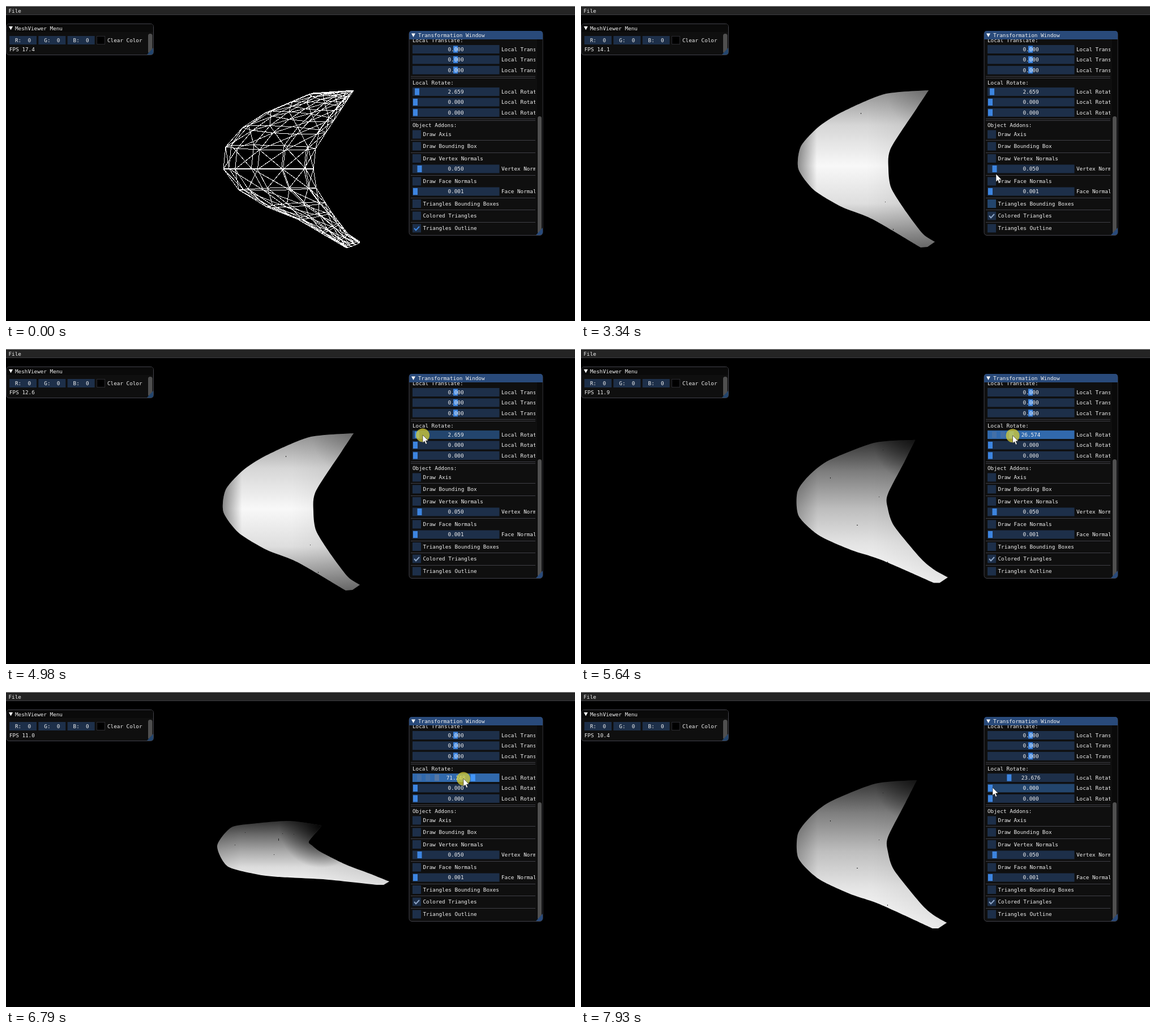
An HTML page for the animation above (8000 ms loop, 1005 px wide and 557 px high).

```html
<!DOCTYPE html>
<html lang="en">
<head>
<meta charset="utf-8">
<title>Mesh viewer</title>
<style>
html, body { margin: 0; width: 100%; height: 100%; overflow: hidden; background: #000; }
svg { display: block; }
text { font: 9.3px "DejaVu Sans Mono", monospace; fill: #f2f2f2; white-space: pre; }
</style>
</head>
<body>
<svg id="stage" width="1005" height="557" viewBox="0 0 1005 557">
  <defs>
    <clipPath id="panelClip"><rect x="713" y="59" width="222" height="345"/></clipPath>
    <linearGradient id="light" x1="0" y1="0" x2="0" y2="1"></linearGradient>
    <linearGradient id="rim"></linearGradient>
    <radialGradient id="tipShade" gradientUnits="userSpaceOnUse" r="75"></radialGradient>
  </defs>
</svg>
<script>
const LOOP = 8000, LAG = 150;
const stage = document.getElementById('stage');
const byId = id => document.getElementById(id);

function add(parent, tag, attrs, content) {
  const el = document.createElementNS('http://www.w3.org/2000/svg', tag);
  for (const k in attrs) el.setAttribute(k, attrs[k]);
  if (content !== undefined) el.textContent = content;
  return parent.appendChild(el);
}
const box = (p, x, y, width, height, fill, extra) =>
  add(p, 'rect', { x, y, width, height, fill, ...extra });
const label = (p, x, mid, s, extra) => add(p, 'text', { x, y: mid + 3.3, ...extra }, s);
const shape = (p, d, fill, extra) => add(p, 'path', { d, fill, ...extra });
const show = (el, on) => el.setAttribute('visibility', on ? 'visible' : 'hidden');
const lerp = (a, b, u) => a + (b - a) * u;

// Piecewise linear track: rows of [time, ...values].
function track(keys, t) {
  if (t <= keys[0][0]) return keys[0].slice(1);
  const i = keys.findIndex(k => k[0] > t);
  if (i < 0) return keys[keys.length - 1].slice(1);
  const a = keys[i - 1], b = keys[i], u = (t - a[0]) / (b[0] - a[0]);
  return a.slice(1).map((v, j) => lerp(v, b[j + 1], u));
}
const held = (keys, t) => keys.filter(k => k[0] <= t).pop()[1];

// ---- mesh ----
// Silhouette per angle: 10 outer points from the upper tip, the end cap, then 7 inner points.
const pose = (angle, pts, tones, rim, tip, specks) => ({
  angle, tones, rim, tip, specks, pts: pts.split(' ').map(p => p.split(',').map(Number))
});
const poses = [
  pose(2.659, '614,149 535,156 458,189 418,215 388,249 384,288 411,325 460,355 515,377 600,427 612,426 625,417 604,403 575,365 548,322 543,288 547,252 593,181',
    [145, 214, 248, 222, 112], .44, .2, 'M494 189h1v2h-1zM537 346h1v1h-1zM551 394h1v2h-1z'),
  pose(23.676, '593,156 520,162 440,194 405,221 383,251 384,294 419,330 475,357 527,375 621,418 631,418 646,408 622,394 600,374 553,315 542,282 542,257 573,196',
    [50, 126, 190, 228, 255], .25, .6, 'M533 178h1v1h-1zM440 227h1v2h-1zM526 261h1v1h-1zM487 311h2v1h-2zM541 376h1v2h-1z'),
  pose(62.944, '556,222 500,213 433,222 397,236 374,266 390,307 435,324 497,334 560,341 652,359 664,358 673,350 640,339 600,321 556,290 539,273 536,264 552,237',
    [35, 110, 172, 214, 255], .1, .95, 'M486 236h1v1h-1zM503 245h1v1h-1zM516 234h1v1h-1zM421 254h1v2h-1zM483 321h1v1h-1zM521 319h1v1h-1z'),
  pose(71.248, '557,236 500,228 434,233 397,240 373,272 391,308 441,322 480,327 560,331 655,341 667,341 677,335 642,321 600,305 556,283 540,271 535,264 554,241',
    [48, 108, 170, 220, 244], .1, .95, 'M422 248h1v1h-1zM404 270h1v1h-1zM488 250h1v1h-1zM508 251h1v1h-1zM481 259h1v4h-1zM473 287h1v1h-1z')
];

// Smooth open curve through the points, as Bezier commands after the first point.
function curve(pts) {
  let d = '';
  for (let i = 0; i < pts.length - 1; i++) {
    const a = pts[i], b = pts[i + 1], before = pts[i - 1] || a, after = pts[i + 2] || b;
    const c1 = a.map((v, k) => v + (b[k] - before[k]) / 8);
    const c2 = b.map((v, k) => v - (after[k] - a[k]) / 8);
    d += 'C' + [...c1, ...c2, ...b].map(v => v.toFixed(1)).join(' ');
  }
  return d;
}
const outline = pts => `M${pts[0]}${curve(pts.slice(0, 10))}L${pts[10]}L${pts[11]}` +
  curve([...pts.slice(11), pts[0]]) + 'Z';

// Rings of ten vertices span the silhouette; quads between them are split by a diagonal.
function wires(pts) {
  const outer = pts.slice(0, 10), inner = [pts[0], ...pts.slice(11).reverse()];
  const at = (chain, i) => {
    const a = chain[Math.floor(i)], b = chain[Math.ceil(i)];
    return a.map((v, k) => lerp(v, b[k], i % 1));
  };
  const spans = [[0, 0], [.5, .3], [1, .6], [1.5, 1], [2, 1.3], [3, 1.6], [4, 2], [5, 3],
    [6, 4], [7, 4.6], [8, 5], [8.5, 5.5], [8.8, 6], [9, 7]];
  const N = 10;
  const rings = spans.map(([o, n]) => {
    const l = at(outer, o), r = at(inner, n);
    const depth = (r[0] - l[0]) / 4;
    return Array.from({ length: N }, (_, j) => {
      const phi = j / N * 2 * Math.PI, u = .5 - Math.cos(phi) / 2;
      const z = depth * Math.sin(phi), k = 1 + z / 438;
      return { z, x: 502.5 + (lerp(l[0], r[0], u) - 502.5) * k,
        y: 278.5 + (lerp(l[1], r[1], u) - 278.5) * k - z * .046 };
    });
  });
  const d = { front: '', back: '' };
  const edge = (a, b) => {
    d[a.z > -.01 && b.z > -.01 ? 'front' : 'back'] +=
      `M${a.x.toFixed(1)} ${a.y.toFixed(1)}L${b.x.toFixed(1)} ${b.y.toFixed(1)}`;
  };
  rings.forEach((ring, i) => ring.forEach((v, j) => {
    edge(v, ring[(j + 1) % N]);
    const next = rings[i + 1];
    if (!next) return;
    edge(v, next[j]);
    edge(v, next[(j + 1) % N]);
  }));
  return d;
}

const stops = (id, list) => list.map(([offset, opacity]) =>
  add(byId(id), 'stop', { offset, 'stop-color': '#000', 'stop-opacity': opacity }));
const lightStops = stops('light', [[0, 1], [.22, 1], [.48, 1], [.72, 1], [1, 1]]);
const rimStops = stops('rim', [[0, .4], [.14, 0], [.5, 0], [1, .1]]);
const tipStops = stops('tipShade', [[0, 1], [1, 0]]);

const solid = add(stage, 'g', {});
const layers = ['light', 'rim', 'tipShade'].map(id => shape(solid, '', `url(#${id})`));
const specks = shape(solid, '', '#222');
const net = wires(poses[0].pts);
const wire = { stroke: '#fff', 'stroke-width': 1, 'shape-rendering': 'crispEdges' };
const backWire = shape(stage, net.back, 'none', wire);
const frontWire = shape(stage, net.front, 'none', wire);

function drawMesh(angle) {
  let i = 0;
  while (i < poses.length - 2 && angle > poses[i + 1].angle) i++;
  const a = poses[i], b = poses[i + 1];
  const u = (angle - a.angle) / (b.angle - a.angle), v = Math.min(1, u);
  const pts = a.pts.map((p, j) => p.map((c, k) => lerp(c, b.pts[j][k], u)));
  const d = outline(pts);
  layers.forEach(el => el.setAttribute('d', d));
  lightStops.forEach((s, j) => {
    const g = Math.round(lerp(a.tones[j], b.tones[j], v));
    s.setAttribute('stop-color', `rgb(${g},${g},${g})`);
  });
  rimStops[0].setAttribute('stop-opacity', lerp(a.rim, b.rim, v));
  tipStops[0].setAttribute('stop-opacity', lerp(a.tip, b.tip, v));
  byId('tipShade').setAttribute('cx', pts[0][0]);
  byId('tipShade').setAttribute('cy', pts[0][1]);
  specks.setAttribute('d', (v > .5 ? b : a).specks);
}

// ---- interface ----
const FRAME = '#1d2f49', HOVER = '#23456d', ACTIVE = '#3169ac', GRAB = '#3d85e0';
const border = { rx: 5, stroke: '#42424a' };

box(stage, 0, 0, 1005, 15, '#242424');
box(stage, 0, 0, 1005, 1, '#9a9a9a');
box(stage, 0, 15, 1005, 1, '#3c3c40');
label(stage, 4.5, 9, 'File');

box(stage, .5, 31.5, 260, 55, '#0f0f0f', border);
shape(stage, 'M1 46V36q0-4 4-4H256q4 0 4 4V46Z', '#0a0a0a');
shape(stage, 'M5 36h7l-3.500 6.500z', '#fff');
label(stage, 16, 39.500, 'MeshViewer Menu');
['R', 'G', 'B'].forEach((c, i) => {
  box(stage, 6 + i * 51.3, 53, 48, 15, FRAME);
  label(stage, 30 + i * 51.3, 61, c + ':  0', { 'text-anchor': 'middle' });
});
box(stage, 160.5, 53.5, 14, 14, '#000', { stroke: '#2b2b30' });
label(stage, 179, 61, 'Clear Color');
const fps = label(stage, 6, 77, '');
box(stage, 251, 49, 7.5, 35, '#4f4f4f', { rx: 3.500 });
shape(stage, 'M260 74V82q0 4-4 4H249Z', HOVER);

box(stage, 712, 44.5, 236, 361, '#0f0f0f', border);
shape(stage, 'M712 59V49q0-5 5-5H943q5 0 5 5V59Z', '#294a7a');
shape(stage, 'M716 48.500h7l-3.500 6.500z', '#fff');
label(stage, 728, 52, 'Transformation Window');
box(stage, 938, 59, 9.5, 345, '#0a0a0a');
box(stage, 939, 195, 7, 208, '#4f4f4f', { rx: 3.500 });
shape(stage, 'M948 392V400q0 5-5 5H936Z', '#294a7a');

const panel = add(stage, 'g', { 'clip-path': 'url(#panelClip)' });
[[61, 'Local Translate:'], [135.5, 'Local Rotate:'], [211, 'Object Addons:']]
  .forEach(([y, s]) => label(panel, 718, y, s));
[124, 127, 199, 202, 237, 259, 299, 339, 360, 382].forEach(y => box(panel, 715, y, 220, 1, '#3f3f46'));

function slider(y, value, knobX, name) {
  const bg = box(panel, 718, y - 7.5, 153.5, 15, FRAME);
  const extras = add(panel, 'g', {});
  const knob = box(panel, knobX - 4, y - 6, 8, 12, GRAB);
  const text = label(panel, 794.5, y, value, { 'text-anchor': 'middle' });
  label(panel, 875, y, name);
  return { y, bg, extras, knob, text, width: 153.5 };
}
function checkbox(y, name) {
  const bg = box(panel, 718, y - 7.5, 15, 15, FRAME);
  const mark = shape(panel, `M721 ${y}l3 3.500 6-6.500`, 'none', { stroke: GRAB, 'stroke-width': 2, visibility: 'hidden' });
  label(panel, 736.5, y, name);
  return { y, bg, mark, width: 30 };
}
const sliders = [
  ...['X', 'Y', 'Z'].map((c, i) => slider(76.5 + 18.4 * i, '0.000', 794, 'Local Translate ' + c)),
  ...['X', 'Y', 'Z'].map((c, i) => slider(151.6 + 18.4 * i, '0.000', 723, 'Local Rotate ' + c)),
  slider(288, '0.050', 730.5, 'Vertex Normals Scale'),
  slider(328, '0.001', 723, 'Face Normals Scale')
];
const boxes = [[227, 'Draw Axis'], [248, 'Draw Bounding Box'], [269.5, 'Draw Vertex Normals'],
  [310, 'Draw Face Normals'], [349.5, 'Triangles Bounding Boxes'], [371, 'Colored Triangles'],
  [393, 'Triangles Outline']].map(([y, s]) => checkbox(y, s));
const items = [...sliders, ...boxes];
const rotate = sliders[3], colored = boxes[5], outlined = boxes[6];
colored.mark.setAttribute('stroke', '#8ba3c4');

// Faint trails the grab leaves behind while dragging.
const trails = [[5300, 730], [5600, 745], [5960, 761]].map(([from, x]) => ({
  from, el: box(rotate.extras, x - 4, 146, 8, 11, '#6f7f9a', { opacity: x === 761 ? .6 : .3 })
}));

const halo = add(stage, 'circle', { r: 12, fill: '#d6cd35', opacity: .75 });
const arrow = shape(stage, 'M0 0V14L3.200 11 5.400 16.300 7.700 15.300 5.500 10.100H9.800Z', '#fff',
  { stroke: '#111', 'stroke-width': .6 });

// ---- timing ----
const cursorKeys = [[120, 955, 533], [300, 880, 460], [500, 775, 392], [710, 726, 371],
  [1440, 726, 371], [1650, 736, 384], [1850, 735, 391], [2130, 731, 389], [3000, 731, 389],
  [3190, 732, 350], [3340, 733, 297], [3650, 734, 285], [4000, 735, 248], [4200, 735, 232],
  [4500, 736, 175], [4700, 736, 152], [5050, 736, 152], [5300, 748, 152], [5700, 765, 153],
  [5900, 813, 157], [6030, 822, 157], [6250, 838, 158], [6500, 838, 157], [6660, 824, 154],
  [6790, 808, 153], [7050, 785, 153], [7350, 756, 153], [7520, 756, 153], [7760, 734, 166], [7930, 727, 169]];
const angleKeys = [[0, 2.659], [5300, 14.541], [5600, 26.574], [5960, 62.944], [6250, 80.132],
  [6720, 71.248], [6960, 53.016], [7200, 35.385], [7450, 23.676]];
const fpsKeys = [[0, 17.4], [1650, 16.2], [3340, 14.1], [4980, 12.6], [6030, 11.5], [6790, 11], [7930, 10.4]];
const presses = [[980, 1230], [2340, 2600], [4900, 7500]];

function render(t) {
  const [x, y] = track(cursorKeys, t), [hx, hy] = track(cursorKeys, t - LAG);
  const angle = held(angleKeys, t);
  const dragging = t >= 5050 && t < 7560;
  const isColored = t >= 1160, isOutlined = t < 2600;

  drawMesh(angle);
  show(solid, isColored);
  show(frontWire, isOutlined);
  show(backWire, isOutlined);
  frontWire.setAttribute('opacity', isColored ? .8 : 1);
  backWire.setAttribute('opacity', isColored ? .25 : 1);

  fps.textContent = 'FPS ' + track(fpsKeys, t)[0].toFixed(1);
  items.forEach(item => {
    const over = !dragging && t > 120 && hx >= 718 && hx < 718 + item.width && Math.abs(hy - item.y) < 8;
    item.bg.setAttribute('fill', over ? HOVER : FRAME);
  });
  if (dragging) rotate.bg.setAttribute('fill', ACTIVE);
  rotate.knob.setAttribute('x', 718.2 + 1.44 * angle);
  rotate.knob.setAttribute('fill', dragging ? '#4296fa' : GRAB);
  rotate.text.textContent = angle.toFixed(3);
  trails.forEach(tr => show(tr.el, dragging && t >= tr.from));
  show(colored.mark, isColored);
  show(outlined.mark, isOutlined);

  show(arrow, t >= 120);
  arrow.setAttribute('transform', `translate(${x} ${y})`);
  show(halo, presses.some(([a, b]) => t >= a && t < b));
  halo.setAttribute('cx', x);
  halo.setAttribute('cy', y + .5);
}

const start = performance.now();
function tick() {
  render((performance.now() - start) % LOOP);
  requestAnimationFrame(tick);
}
render(0);
requestAnimationFrame(tick);
</script>
</body>
</html>
```
